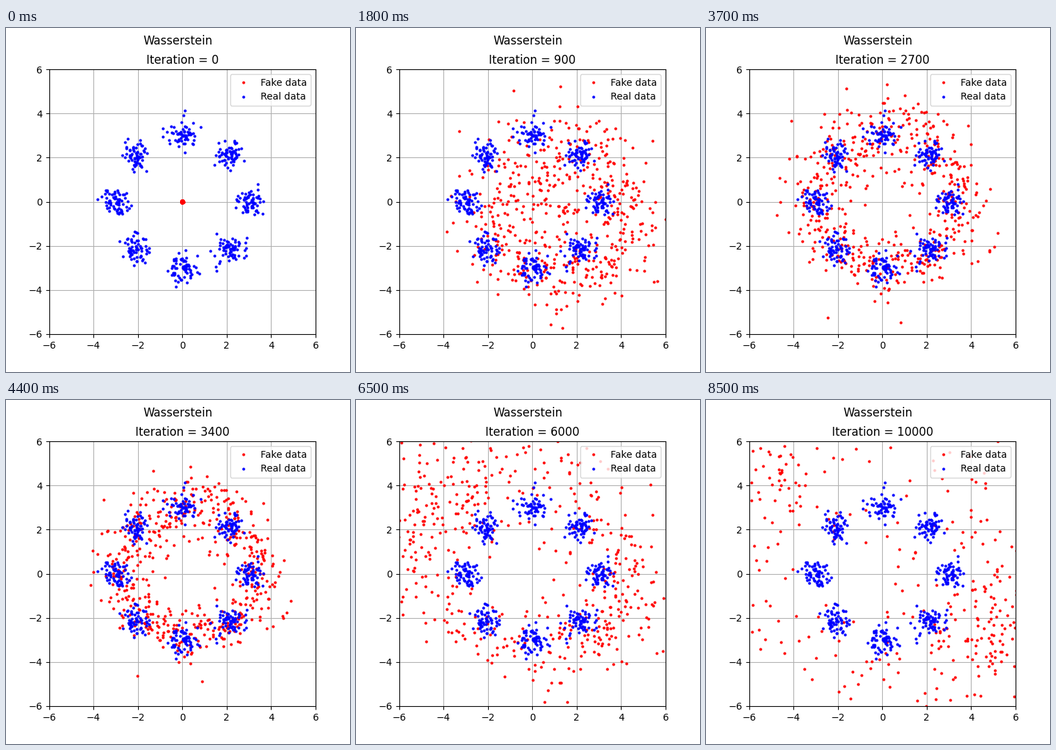
Animation, 500 px wide and 500 px high, one loop 8600 ms. Source, as a matplotlib script:

```python
import numpy as np
import matplotlib.pyplot as plt
from matplotlib.animation import FuncAnimation

FRAMES, INTERVAL = 86, 100
CLUSTERS, PER_CLUSTER = 8, 64
N_FAKE = 512
LEAN = np.radians(148)  # direction in which the ring finally gathers

# frame, centre x, centre y, ring radius, relative spread
KEYS = np.array([
    (0, 0, 0, 0.02, 0.5),
    (5, 0.3, -0.2, 3.2, 0.45),
    (18, 1.4, -0.6, 2.9, 0.34),
    (29, 0.1, 0.1, 3.4, 0.25),
    (44, 0.4, 0.2, 3.0, 0.2),
    (56, -0.3, 0.5, 3.7, 0.22),
    (85, -0.9, 1.3, 6.2, 0.28),
])

rng = np.random.default_rng(11)


def cluster_samples():
    angle = np.repeat(np.arange(CLUSTERS) * 2 * np.pi / CLUSTERS, PER_CLUSTER)
    centre = 3 * np.column_stack([np.cos(angle), np.sin(angle)])
    return centre + rng.normal(0, 0.31, centre.shape)


real = cluster_samples()
turn = rng.permutation(np.arange(N_FAKE) + rng.random(N_FAKE)) * 2 * np.pi / N_FAKE
push = rng.normal(0, 1, N_FAKE)
push[rng.random(N_FAKE) < 0.1] *= 1.6
phase = rng.uniform(0, 2 * np.pi, (2, N_FAKE))


def fake_samples(frame):
    cx, cy, radius, spread = (np.interp(frame, KEYS[:, 0], col)
                              for col in KEYS.T[1:])
    late = np.clip((frame - 50) / 35, 0, 1)
    squash = 0.68 * (1 - (1 - late) ** 2)
    # Squashing the angles gathers points at both ends of the lean axis
    angle = np.arctan2((1 - squash) * np.sin(turn), np.cos(turn))
    r = np.abs(radius * (1 + 0.2 * squash * np.cos(2 * angle)) * (1 + spread * push))
    sway = 0.12 * min(1, frame / 5) * np.sin(0.9 * frame + phase)
    x = cx + r * np.cos(angle + LEAN) + sway[0]
    y = cy + r * np.sin(angle + LEAN) + sway[1]
    return x, y


def iteration(frame):
    """Steps of 50, then 100 from frame 20, then 200 from frame 60."""
    return 50 * (frame + max(0, frame - 20) + 2 * max(0, frame - 60))


fig, ax = plt.subplots(figsize=(5, 5), dpi=100)
fig.suptitle("Wasserstein")
fake, = ax.plot([], [], "r.", markersize=4, label="Fake data")
ax.plot(*real.T, "b.", markersize=4, label="Real data")
ax.set(xlim=(-6, 6), ylim=(-6, 6))
ax.grid(True)
ax.legend(loc="upper right")
title = ax.set_title("Iteration = 0")


def update(frame):
    fake.set_data(*fake_samples(frame))
    title.set_text(f"Iteration = {iteration(frame)}")
    return fake, title


anim = FuncAnimation(fig, update, frames=FRAMES, interval=INTERVAL,
                     init_func=lambda: update(0), repeat=True, repeat_delay=0)
plt.show()
```
